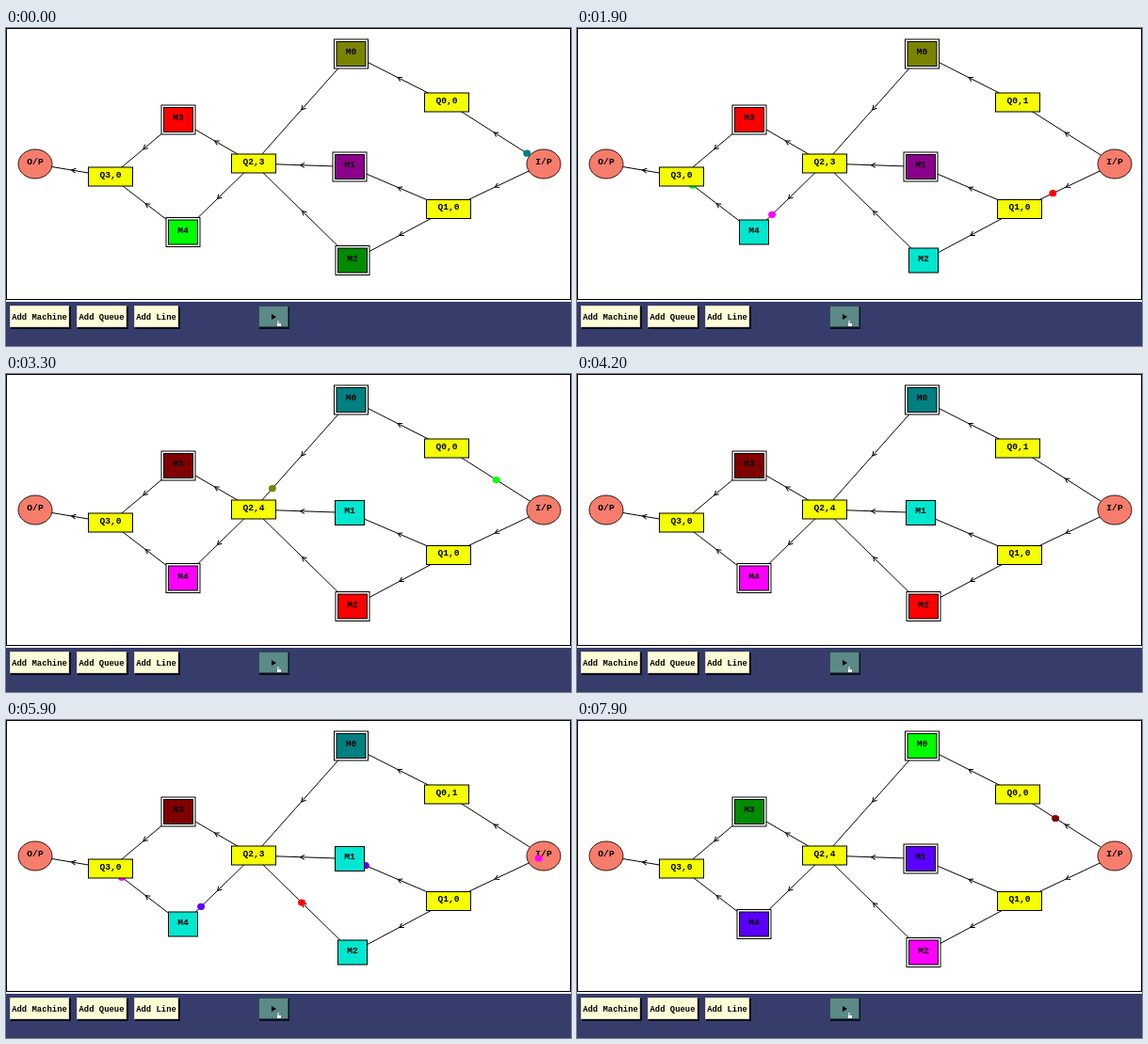
Recreate the animation shown at these times as an HTML page with a canvas. Size 600 by 338 pixels, loop 8000 ms.

```html
<!DOCTYPE html>
<html lang="en">
<head>
<meta charset="utf-8">
<title>Production line simulation</title>
<style>
  html, body { margin: 0; width: 100%; height: 100%; overflow: hidden; background: #fff; }
  canvas { display: block; width: 600px; height: 338px; }
</style>
</head>
<body>
<canvas id="stage" width="600" height="338"></canvas>
<script>
const ctx = document.getElementById('stage').getContext('2d');
const LOOP = 8000, TICK = 100, SPEED = 0.142; // px per ms

const C = {
  idle: '#00e6cf', olive: '#7a8400', purple: '#8b008b', forest: '#008c00', red: '#ff0000',
  lime: '#00ff00', teal: '#008080', magenta: '#ff00ff', maroon: '#800000', blue: '#5a00ff'
};

const nodes = {
  M0: [366.5, 27.5], M1: [365, 147.5], M2: [368, 247], M3: [183, 97.5], M4: [188, 217],
  Q0: [468, 79], Q1: [470, 192.5], Q2: [263, 144], Q3: [111, 158],
  'I/P': [571, 144.5], 'O/P': [31, 144.5]
};

const edges = ['I/P Q0', 'I/P Q1', 'Q0 M0', 'Q1 M1', 'Q1 M2', 'M0 Q2', 'M1 Q2', 'M2 Q2',
  'Q2 M3', 'Q2 M4', 'M3 Q3', 'M4 Q3', 'Q3 O/P'].map(e => e.split(' '));

const firstJobs = { M0: 'olive', M1: 'purple', M2: 'forest', M3: 'red', M4: 'lime' };

// Each trip: from, to, colour, departure time
const trips = [
  ['I/P', 'Q0', 'teal', -148],
  ['M2', 'Q2', 'forest', 400],
  ['M4', 'Q3', 'lime', 1323],
  ['Q2', 'M4', 'magenta', 1351],
  ['I/P', 'Q1', 'red', 1388],
  ['Q1', 'M2', 'red', 2174],
  ['M3', 'Q3', 'red', 2356],
  ['Q2', 'M3', 'maroon', 2401],
  ['M0', 'Q2', 'olive', 2413],
  ['Q0', 'M0', 'teal', 2413],
  ['M1', 'Q2', 'purple', 2430],
  ['I/P', 'Q0', 'lime', 2880],
  ['I/P', 'Q1', 'blue', 4436],
  ['Q1', 'M1', 'blue', 5224],
  ['M4', 'Q3', 'magenta', 5323],
  ['Q2', 'M4', 'blue', 5351],
  ['M2', 'Q2', 'red', 5368],
  ['I/P', 'Q1', 'magenta', 5858],
  ['M3', 'Q3', 'maroon', 6060],
  ['Q2', 'M3', 'forest', 6100],
  ['M0', 'Q2', 'teal', 6423],
  ['Q0', 'M0', 'lime', 6430],
  ['Q1', 'M2', 'magenta', 6669],
  ['I/P', 'Q0', 'maroon', 7375]
].map(([from, to, color, start]) => {
  const [x, y] = nodes[from], [u, v] = nodes[to];
  return { from, to, color, start, end: start + Math.hypot(u - x, v - y) / SPEED };
});

// Queue lengths: [time, value] steps
const counts = {
  Q0: [[0, 0], [710, 1], [2413, 0], [3738, 1], [6430, 0]],
  Q1: [[0, 0]],
  Q2: [[0, 3], [400, 4], [1351, 3], [2401, 2], [2413, 3], [2430, 4], [5351, 3], [6423, 4]],
  Q3: [[0, 0]]
};

function box(x, y, w, h, fill, stroke = '#000') {
  ctx.fillStyle = fill;
  ctx.fillRect(x, y, w, h);
  ctx.strokeStyle = stroke;
  ctx.strokeRect(x, y, w, h);
}

function oval(x, y, rx, ry, fill) {
  ctx.beginPath();
  ctx.ellipse(x, y, rx, ry, 0, 0, 2 * Math.PI);
  ctx.fillStyle = fill;
  ctx.fill();
}

function label(text, x, y, size = 9.6) {
  ctx.font = `bold ${size}px "Liberation Mono", monospace`;
  ctx.fillStyle = '#000';
  ctx.fillText(text, x, y);
}

function drawEdge([from, to]) {
  const [x, y] = nodes[from], [u, v] = nodes[to];
  ctx.strokeStyle = '#000';
  ctx.beginPath();
  ctx.moveTo(x, y);
  ctx.lineTo(u, v);
  ctx.stroke();
  ctx.save();
  ctx.translate((x + u) / 2, (y + v) / 2);
  ctx.rotate(Math.atan2(v - y, u - x));
  ctx.beginPath();
  ctx.moveTo(-3, -2.5);
  ctx.lineTo(1.5, 0);
  ctx.lineTo(-3, 2.5);
  ctx.stroke();
  ctx.restore();
}

function drawTerminal(name) {
  const [x, y] = nodes[name];
  oval(x, y, 18, 15.5, '#f67d6b');
  ctx.strokeStyle = '#301410';
  ctx.stroke();
  label(name, x, y + 0.5);
}

function drawBall(trip, t) {
  if (t < trip.start || t >= trip.end) return;
  const k = (t - trip.start) / (trip.end - trip.start);
  const [x, y] = nodes[trip.from], [u, v] = nodes[trip.to];
  oval(x + (u - x) * k, y + (v - y) * k, 4, 3.6, C[trip.color]);
}

function currentJob(name, t) {
  let job = firstJobs[name];
  for (const trip of trips) {
    if (trip.from === name && t >= trip.start) job = null;
    if (trip.to === name && t >= trip.end) job = trip.color;
  }
  return job;
}

function drawMachine(name, t) {
  const [x, y] = nodes[name], job = currentJob(name, t);
  if (job) box(x - 18, y - 15.5, 36, 31, '#fff');
  box(x - 15.5, y - 13, 31, 26, C[job || 'idle']);
  label(name, x, y + 0.5);
}

function drawQueue(name, t) {
  const [x, y] = nodes[name];
  const count = counts[name].filter(step => step[0] <= t).pop()[1];
  box(x - 23.5, y - 10, 47, 20, '#f5ff00');
  label(`${name},${count}`, x, y + 0.5);
}

function drawButton(text, x, w) {
  ctx.fillStyle = '#0c0e1c';
  ctx.fillRect(x + 1, 296, w + 1, 24);
  box(x + 0.5, 295.5, w - 1, 22, '#fffcd8', '#d8d6b8');
  label(text, x + w / 2, 309.5, 8.9);
}

function drawToolbar() {
  ctx.fillStyle = '#363d6a';
  ctx.fillRect(0, 291, 600, 47);
  drawButton('Add Machine', 4, 63);
  drawButton('Add Queue', 75, 53);
  drawButton('Add Line', 136, 47);
  ctx.fillStyle = '#0c0e1c';
  ctx.fillRect(269, 296, 32, 24);
  box(268.5, 295.5, 31, 22, '#5c8a88', '#304a50');
  ctx.fillStyle = '#000';
  ctx.beginPath();
  ctx.moveTo(282, 304);
  ctx.lineTo(287, 307);
  ctx.lineTo(282, 310);
  ctx.fill();
  // Hand pointer
  ctx.fillStyle = '#fff';
  ctx.fillRect(288.5, 311, 1, 4);
  ctx.fillRect(288, 314, 4, 3);
}

function draw(t) {
  ctx.lineWidth = 1;
  ctx.textAlign = 'center';
  ctx.fillStyle = '#fff';
  ctx.fillRect(0, 0, 600, 338);
  ctx.strokeStyle = '#000';
  ctx.strokeRect(0.5, 0.5, 599, 288);
  edges.forEach(drawEdge);
  ['I/P', 'O/P'].forEach(drawTerminal);
  trips.forEach(trip => drawBall(trip, t));
  Object.keys(firstJobs).forEach(name => drawMachine(name, t));
  Object.keys(counts).forEach(name => drawQueue(name, t));
  drawToolbar();
}

function frame() {
  draw(Math.floor(performance.now() % LOOP / TICK) * TICK);
  requestAnimationFrame(frame);
}
frame();
</script>
</body>
</html>
```
